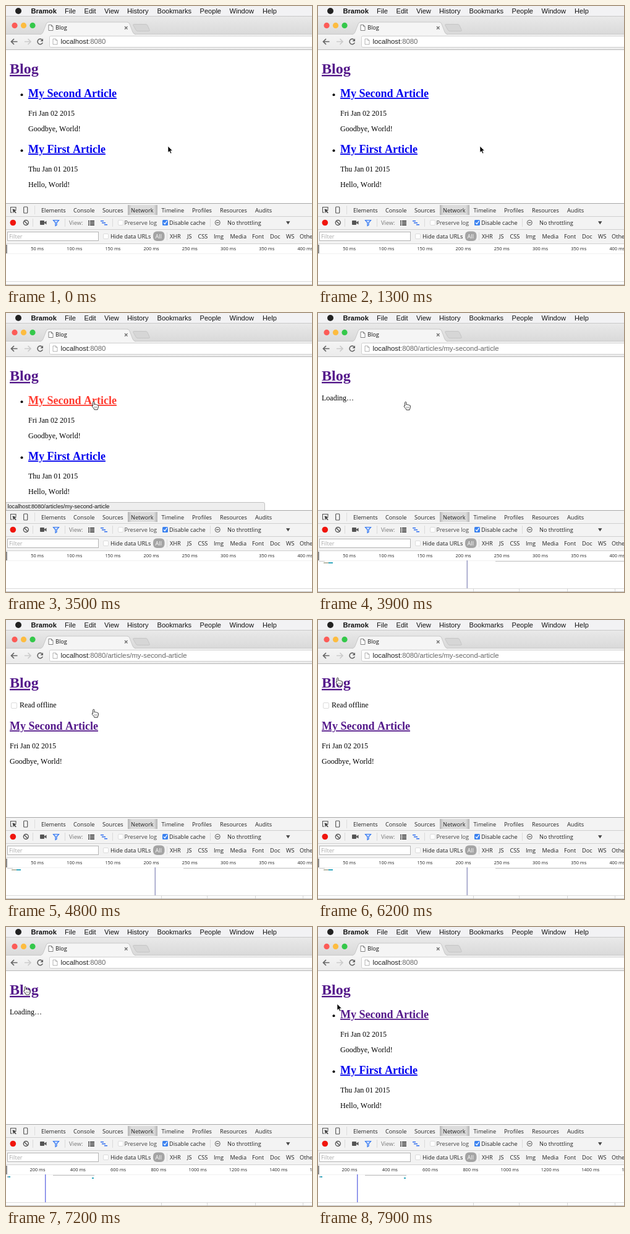
These frames come from a looping animation (495 by 450 pixels, 8000 ms). An HTML page:

```html
<!DOCTYPE html>
<html lang="en">
<head>
<meta charset="utf-8">
<title>Blog</title>
<style>
html, body { margin: 0; width: 100%; height: 100%; overflow: hidden; background: #fff; }
svg { display: block; width: 495px; height: 450px; }
text { white-space: pre; }
.menu { font: 11.1px "Liberation Sans", Arial, sans-serif; fill: #111; }
.url { font: 11.3px "Liberation Sans", Arial, sans-serif; fill: #222; }
.status { font: 9.15px "Liberation Sans", Arial, sans-serif; fill: #111; }
.ui { font: 9.2px "Open Sans", "Noto Sans", sans-serif; fill: #222; }
.tick { font: 7.4px "Open Sans", "Noto Sans", sans-serif; fill: #222; text-anchor: end; }
.p, .h1, .h2 { font: 12px "Liberation Serif", Times, serif; font-kerning: none; }
.h1, .h2 { font-weight: bold; font-size: 24px; text-decoration: underline; text-decoration-skip-ink: none; }
.h2 { font-size: 18px; }
</style>
</head>
<body>
<svg id="stage" viewBox="0 0 495 450">
<defs>
  <linearGradient id="strip" x2="0" y2="1"><stop stop-color="#e9e9e9"/><stop offset="1" stop-color="#d9d9d9"/></linearGradient>
  <linearGradient id="bar" x2="0" y2="1"><stop stop-color="#f5f5f5"/><stop offset="1" stop-color="#ebebeb"/></linearGradient>
  <linearGradient id="picked"><stop stop-color="#b4b4b4"/><stop offset=".12" stop-color="#dcdcdc"/><stop offset=".88" stop-color="#dcdcdc"/><stop offset="1" stop-color="#b4b4b4"/></linearGradient>
</defs>
</svg>
<script>
const LOOP = 8000, BLUE = '#0000ee', PURPLE = '#551a8b', RED = '#ff3b30';
const HOST = 'localhost', HOME = ':8080', ARTICLE = ':8080/articles/my-second-article';
const stage = document.getElementById('stage');

const text = (cls, x, y, s, more = '') => `<text class="${cls}" x="${x}" y="${y}" ${more}>${s}</text>`;
const rect = (x, y, w, h, fill, more = '') => `<rect x="${x}" y="${y}" width="${w}" height="${h}" fill="${fill}" ${more}/>`;
const dot = (x, y, r, fill, more = '') => `<circle cx="${x}" cy="${y}" r="${r}" fill="${fill}" ${more}/>`;
const path = (d, stroke, w = 1, fill = 'none') => `<path d="${d}" stroke="${stroke}" stroke-width="${w}" fill="${fill}"/>`;
const row = (cls, y, items) => items.map(([x, s]) => text(cls, x, y, s)).join('');
const box = (x, y, s = 8) => rect(x + .5, y + .5, s, s, '#fff', 'stroke="#dcdcdc" rx="1.5"');
const group = (id, s) => `<g id="${id}">${s}</g>`;
const page = (x, y, color) => path(`M${x} ${y}h4.5l2.5 2.5v6.500h-7zM${x + 4.5} ${y}v2.5h2.5`, color, .9, '#fff');

const menuBar = rect(0, 0, 495, 16, '#f2f2f4') + rect(0, 16, 495, 1, '#c9c9c9') +
  dot(20, 8, 5, '#222') +
  text('menu', 40.5, 12, 'Bramok', 'style="font-weight:bold"') +
  row('menu', 12, [[95, 'File'], [126.5, 'Edit'], [159, 'View'], [196, 'History'],
    [244.5, 'Bookmarks'], [313.5, 'People'], [361.5, 'Window'], [415, 'Help']]);

const browser = rect(0, 17, 495, 29, 'url(#strip)') + rect(0, 45, 495, 25, 'url(#bar)') +
  path('M0 45.5H495', '#c8c8c8') +
  path('M207 29.5h19q2 0 3 2l3 7q1 2-1 2h-18q-2 0-3-2l-4-7q-1-2 1-2z', '#c6c6c6', 1, '#d6d6d6') +
  path('M55 46q4-1 5-4l5-13q1-3 4-3H196q3 0 4 3l5 13q1 3 5 4', '#c8c8c8', 1, '#f5f5f5') +
  dot(14, 31.4, 4.6, '#fc5b57') + dot(28.5, 31.4, 4.6, '#fdbc40') + dot(43, 31.4, 4.6, '#34c84a') +
  page(69, 30.5, '#777') + text('ui', 80, 38.3, 'Blog', 'style="fill:#111"') +
  path('M192 33l4.5 4.5M196.5 33l-4.5 4.5', '#666', 1.1) +
  path('M18.5 57.5H8.5M13 53l-4.5 4.5l4.5 4.5', '#666', 1.7) +
  path('M30 57.5H40M35.5 53l4.5 4.5l-4.5 4.5', '#cbcbcb', 1.7) +
  path('M58.5 54.5A4.3 4.3 0 1 0 59.3 59', '#666', 1.6) + path('M60 52.5v4.5h-4.5z', 'none', 0, '#666') +
  rect(70.5, 48.5, 440, 18, '#fff', 'rx="2" stroke="#d0d0d0"') + page(76, 53, '#aaa') +
  rect(0, 70, 495, 1, '#b9b9b9') + group('address', '');

const filters = [[265, 'XHR'], [293, 'JS'], [310.5, 'CSS'], [336, 'Img'], [362.5, 'Media'],
  [398, 'Font'], [427, 'Doc'], [453, 'WS'], [475, 'Other']];
const devtools = rect(0, 318, 495, 66, '#f3f3f3') + rect(197, 321, 48, 16, 'url(#picked)') +
  [318, 339, 360, 383].map(y => rect(0, y, 495, 1, y == 318 ? '#a8a8a8' : '#d0d0d0')).join('') +
  path('M16 328.5V324.5H7.5V333H10.5', '#555', 1.1) + path('M10.5 327l6.5 2.5l-2.7 1.2l2.5 2.6l-1.2 1l-2.5-2.6l-1.1 2.5z', 'none', 0, '#444') +
  rect(28.7, 324, 6, 10, '#f8f8f8', 'rx="1" stroke="#555" stroke-width="1.2"') + rect(46, 322, 1, 14, '#ddd') +
  row('ui', 333, [[57, 'Elements'], [109, 'Console'], [156, 'Sources'], [202, 'Network'], [251.5, 'Timeline'],
    [301, 'Profiles'], [346, 'Resources'], [403, 'Audits']]) +
  dot(11.3, 349.5, 4.8, '#f0150d') +
  dot(32.3, 349.5, 4, 'none', 'stroke="#555" stroke-width="1.4"') + path('M29.5 346.7l5.6 5.6', '#555', 1.4) +
  rect(55, 346, 7, 7, '#555', 'rx="1"') + path('M62 349l3.5-2.5v6l-3.5-2.5z', 'none', 0, '#555') +
  path('M76.5 345.5h9l-3.5 4v4l-2 1v-5z', '#3478f0', 1.2, '#cfe0ff') +
  [43, 95, 172, 330].map(x => rect(x, 343, 1, 13, '#dadada')).join('') +
  text('ui', 102, 353, 'View:', 'style="fill:#777"') +
  [346, 349, 352].map(y => rect(133, y, 2, 2, '#444') + rect(136, y, 7, 2, '#444')).join('') +
  rect(153, 346, 5, 1.5, '#2f6df0') + rect(155, 349, 6, 1.5, '#2f6df0') + rect(159, 352, 5, 1.5, '#2f6df0') +
  box(181, 345) + text('ui', 191.5, 353, 'Preserve log', 'style="fill:#444"') +
  rect(253, 345, 9, 9, '#3b82f0', 'rx="1.5"') + path('M255 349.5l2 2.2l3.5-5', '#fff', 1.3) +
  text('ui', 264, 353, 'Disable cache') +
  dot(342.3, 349.5, 4, 'none', 'stroke="#555" stroke-width="1"') + path('M340 349.5h4.6', '#555', 1.2) +
  text('ui', 358, 353, 'No throttling') + path('M453 347.3h6.5l-3.25 5z', 'none', 0, '#444') +
  rect(2.5, 364.5, 147, 14, '#fff', 'stroke="#b4b4b4"') + text('ui', 5, 375, 'Filter', 'style="fill:#aaa"') +
  box(157, 367) + text('ui', 169, 375, 'Hide data URLs') +
  rect(238, 363.5, 18.5, 15.5, '#a4a4a4', 'rx="6"') + text('ui', 241.5, 375, 'All', 'style="fill:#fff"') +
  rect(260, 365, 1, 13, '#ddd') + row('ui', 375, filters) +
  rect(0, 384, 495, 66, '#fff') + rect(0, 385, 2, 14, '#8a8a8a') +
  rect(0, 399, 495, 1, '#f2f2f2') + rect(0, 444, 495, 1, '#d9d9d9') + rect(0, 449, 495, 1, '#bbb');

// Time labels of the request overview: step in ms, step in pixels, first right edge
const scale = (ms, px, x0) => Array.from({ length: 8 }, (_, i) =>
  text('tick', x0 + i * px, 394, (i + 1) * ms + ' ms')).join('');
const columns = [251, 325, 403, 480].map(x => rect(x, 445, 1, 4, '#d5d5d5')).join('');
const shortScale = scale(50, 62.2, 61);
const firstLoad = shortScale + columns + rect(2, 400, 9, 1, '#ccc') + rect(9, 402, 8, 2, '#b9b9a8') + rect(17, 402, 7, 2, '#35a9c0') +
  rect(287, 400, 208, 1, '#c4c4c4') + rect(240.5, 399, 1.6, 45, '#9d9fc6');
const secondLoad = scale(200, 65.3, 63.5) + columns + rect(2, 402, 3, 2, '#9ab') + rect(4, 402, 3, 2, '#35a9c0') +
  rect(76, 400, 67, 1, '#bdbdbd') + rect(139, 404, 3, 2, '#35a9c0') + rect(63, 399, 1.4, 45, '#6c74e4');

const heading = text('h1', 6, 109, 'Blog', `id="blog" fill="${PURPLE}"`);
const entry = (y, id, title, date, body) => dot(25.5, y - 3.8, 2, '#000') +
  text('h2', 36, y, title, `id="${id}" fill="${BLUE}"`) +
  text('p', 36, y + 30, date) + text('p', 36, y + 55.3, body);
const list = entry(147, 'second', 'My Second Article', 'Fri Jan 02 2015', 'Goodbye, World!') +
  entry(237, 'first', 'My First Article', 'Thu Jan 01 2015', 'Hello, World!');
const article = box(8, 133, 9) + text('p', 22, 141.3, 'Read offline') +
  text('h2', 6, 177, 'My Second Article', `fill="${PURPLE}"`) +
  text('p', 6, 206.5, 'Fri Jan 02 2015') + text('p', 6, 231.8, 'Goodbye, World!');
const status = path('M0 305.5H416q2.5 0 2.5 2.5V318.5H0z', '#c0c0c0', 1, '#eee') +
  text('status', 2.5, 314.6, HOST + ARTICLE);

const arrow = path('M0 0V10.3L2.4 8.2L4.1 12L5.9 11.2L4.2 7.6H7.4Z', '#fff', .7, '#000');
const hand = '<g transform="scale(.95 .86)">' +
  path('M-1.5 1q0-1.3 1.2-1.3t1.3 1.3v4q2-1 2.5.3q1.9-.6 2.3.7q2-.3 2 1.5v2.5q0 1.7-1.3 3.5v1.2h-5.5q-.6-2-2-3.5q-1.6-2-2.2-3.5q.5-1.4 1.7-.2z', '#222', 1, '#fff') +
  path('M1.3 8.7v3M3.3 8.7v3M5.3 8.7v3', '#555', .7) + '</g>';

stage.innerHTML += rect(0, 0, 495, 450, '#fff') + menuBar + browser + heading +
  group('list', list) + group('article', article) + group('loading', text('p', 6, 141.3, 'Loading…')) +
  group('status', status) + devtools +
  group('idle', shortScale) + group('load1', firstLoad) + group('load2', secondLoad) +
  group('pointer', group('arrow', arrow) + group('hand', hand));

const $ = id => document.getElementById(id);
const show = (id, on) => $(id).style.display = on ? '' : 'none';

// Pointer stops: time, x, y
const stops = [[0, 262, 226], [2000, 262, 226], [2600, 162, 160], [3000, 142, 143], [5000, 142, 144.5],
  [5900, 32, 93.5], [6600, 32, 93.5], [6800, 31.5, 96.5], [7500, 31.5, 96.5], [7900, 31, 124], [LOOP, 31, 124]];
function pointer(t) {
  const i = stops.findIndex(s => s[0] > t);
  const [t0, x0, y0] = stops[i - 1], [t1, x1, y1] = stops[i];
  const u = (t - t0) / (t1 - t0), k = u * u * (3 - 2 * u);
  return [x0 + (x1 - x0) * k, y0 + (y1 - y0) * k];
}

function draw(t) {
  const within = (a, b) => t >= a && t < b;
  const loading = within(3700, 4000) || within(6900, 7300);
  const reading = within(4000, 6900);
  show('list', !loading && !reading);
  show('loading', loading);
  show('article', reading);
  show('idle', t < 3800);
  show('load1', within(3800, 7000));
  show('load2', t >= 7000);

  const rest = within(3700, 6900) ? ARTICLE : HOME;
  $('address').innerHTML = text('url', 88.5, 61.3, `${HOST}<tspan fill="#666">${rest}</tspan>`);
  $('second').setAttribute('fill', within(3500, 3700) ? RED : t < 3500 ? BLUE : PURPLE);
  $('blog').setAttribute('fill', within(6800, 6900) ? RED : PURPLE);
  $('status').style.opacity = t < 3700 ? Math.min(1, Math.max(0, (t - 2900) / 300)) : 0;

  const over = within(2900, 5100) || within(5800, 7600);
  show('hand', over);
  show('arrow', !over);
  $('pointer').setAttribute('transform', `translate(${pointer(t)})`);
}

function frame(now) {
  draw(Math.floor(now % LOOP / 100) * 100);
  requestAnimationFrame(frame);
}
requestAnimationFrame(frame);
</script>
</body>
</html>
```
